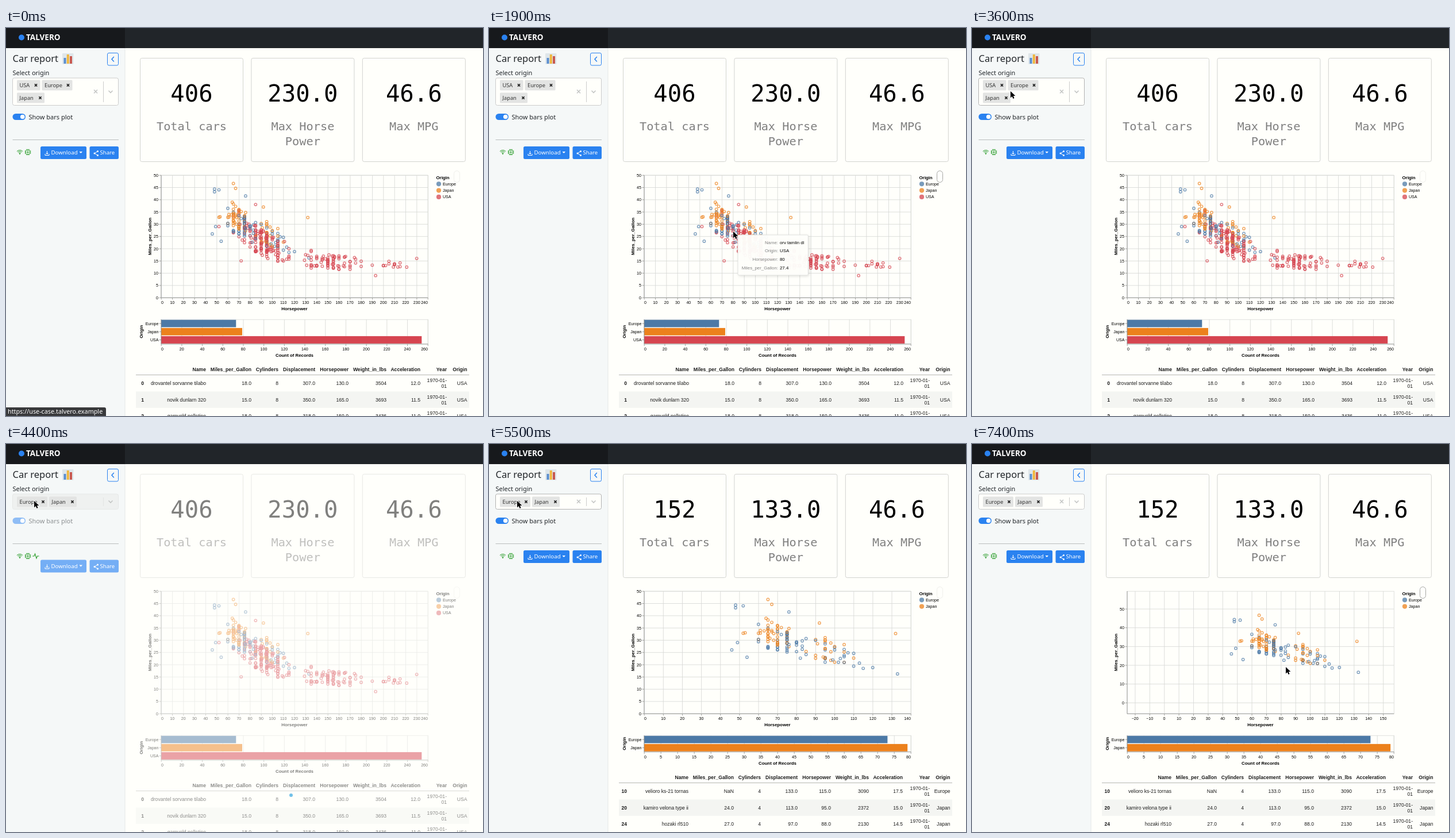
An HTML page with a canvas that plays this animation: 830 by 675 pixels, repeating every 8 s.

```html
<!DOCTYPE html>
<html lang="en">
<head>
<meta charset="utf-8">
<title>Car report</title>
<style>
html, body { margin: 0; width: 100%; height: 100%; overflow: hidden; }
canvas { display: block; }
</style>
</head>
<body>
<canvas id="stage" width="830" height="675"></canvas>
<script>
const c = document.getElementById('stage').getContext('2d');
const SANS = '"Liberation Sans", sans-serif';
const UI = '"Noto Sans", sans-serif';
const MONO = '"DejaVu Sans Mono", monospace';
const PAGE = '#fffffb', BLUE = '#2a82f0', GREEN = '#2a9d2a', GRID = '#d7d9d6';
const COLORS = { Europe: '#4c79a6', Japan: '#ec811c', USA: '#d64550' };
const LEFT = 270, RIGHT = 734, TOP = 256, BOTTOM = 469;

let seed = 11;
const rand = () => (seed = seed * 16807 % 2147483647) / 2147483647;
const points = [];
const add = (origin, hp, mpg) => points.push({ origin, hp, mpg, order: rand() });

// n cars around a horsepower, most of them on multiples of five, mileage near a falling curve
function cluster(origin, n, hp, spread, curve, half) {
  for (let i = 0; i < n; i++) {
    const raw = hp + (rand() + rand() - 1) * spread;
    const snapped = rand() < .7 ? Math.round(raw / 5) * 5 : Math.round(raw);
    add(origin, snapped, curve(snapped) + (rand() * 2 - 1) * half(snapped));
  }
}
const usaCurve = hp => 13 + 17 * Math.exp((70 - hp) / 35);
const usaHalf = hp => Math.max(.8, 6 - (hp - 70) / 30);
cluster('USA', 150, 91, 27, usaCurve, usaHalf);
cluster('USA', 75, 153, 28, usaCurve, usaHalf);
cluster('USA', 14, 208, 20, usaCurve, usaHalf);
cluster('Europe', 44, 76, 20, hp => 30 - (hp - 70) / 5, () => 5);
cluster('Europe', 20, 102, 20, hp => 30 - (hp - 70) / 5, () => 4);
cluster('Japan', 46, 68, 10, hp => 33.5 - (hp - 67) / 4, () => 5);
cluster('Japan', 24, 96, 15, hp => 33 - (hp - 67) / 4, () => 5);
// Cars far from the crowd
for (const [hp, mpg] of [[46, 26], [48, 43.2], [48, 44.3], [52, 44], [49, 29], [54, 23], [76, 41.5], [133, 16.2]]) add('Europe', hp, mpg);
for (const [hp, mpg] of [[65, 46.6], [67, 44.6], [52, 32.8], [53, 33], [92, 37], [132, 32.7]]) add('Japan', hp, mpg);
for (const [hp, mpg] of [[52, 29], [72, 15], [85, 38], [193, 9], [230, 16]]) add('USA', hp, mpg);
points.sort((a, b) => a.order - b.order);

const heads = ['Name', 'Miles_per_Gallon', 'Cylinders', 'Displacement', 'Horsepower', 'Weight_in_lbs', 'Acceleration', 'Year', 'Origin'];
const edges = [348, 427, 474, 538, 596, 662, 721, 767, 802.5];
const allRows = [
  ['0', 'drovantel sorvanne tilabo', '18.0', '8', '307.0', '130.0', '3504', '12.0', '', 'USA'],
  ['1', 'novik dunlarn 320', '15.0', '8', '350.0', '165.0', '3693', '11.5', '', 'USA'],
  ['2', 'garnvold pelletine', '18.0', '8', '318.0', '150.0', '3436', '11.0', '', 'USA']];
const someRows = [
  ['10', 'velioro ks-21 tornas', 'NaN', '4', '133.0', '115.0', '3090', '17.5', '', 'Europe'],
  ['20', 'kamiro velona type ii', '24.0', '4', '113.0', '95.0', '2372', '15.0', '', 'Japan'],
  ['24', 'hozaki rl510', '27.0', '4', '97.0', '88.0', '2130', '14.5', '', 'Japan']];

// Start, end, then the values shown
const tips = [
  [1300, 1500, 'velsor trandel diesel', 'Europe', '76', '25'],
  [1900, 2200, 'orv tamlin dl', 'USA', '80', '27.4'],
  [2300, 3000, 'garnvold tessaro hatchback', 'USA', '80', '28']];

// Pointer stops: time, x, y
const stops = [[400, 300, 73], [1100, 421, 361], [1300, 417, 360], [1900, 425, 354], [2300, 428, 350],
  [2700, 428, 345], [2900, 428, 345], [3600, 67, 110], [4000, 49, 99], [6100, 49, 99], [6600, 546, 388]];

function pointer(t) {
  const next = stops.findIndex(s => s[0] >= t);
  if (next < 1) return stops.at(next).slice(1);
  const [t0, x0, y0] = stops[next - 1], [t1, x1, y1] = stops[next];
  const u = (t - t0) / (t1 - t0), e = u * u * (3 - 2 * u);
  return [x0 + (x1 - x0) * e, y0 + (y1 - y0) * e];
}

// y is the middle of the capitals
function text(s, x, y, size, color = '#000', align = 'left', font = SANS, weight = '') {
  c.font = `${weight} ${size}px ${font}`;
  c.fillStyle = color;
  c.textAlign = align;
  c.fillText(s, x, y + size * .36);
}
function upright(s, x, y) {
  c.save();
  c.translate(x, y);
  c.rotate(-Math.PI / 2);
  text(s, 0, 0, 7.85, '#000', 'center', SANS, 'bold');
  c.restore();
}
function rect(x, y, w, h, color) {
  c.fillStyle = color;
  c.fillRect(x, y, w, h);
}
function box(x, y, w, h, r, fill, stroke) {
  c.beginPath();
  c.roundRect(x, y, w, h, r);
  if (fill) { c.fillStyle = fill; c.fill(); }
  if (stroke) { c.strokeStyle = stroke; c.lineWidth = 1; c.stroke(); }
}
function line(color, width, ...xy) {
  c.beginPath();
  for (let i = 0; i < xy.length; i += 2) c.lineTo(xy[i], xy[i + 1]);
  c.strokeStyle = color;
  c.lineWidth = width;
  c.stroke();
}
function disc(x, y, r, fill) {
  c.beginPath();
  c.arc(x, y, r, 0, 7);
  c.fillStyle = fill;
  c.fill();
}
function cross(x, y, r, color, width) {
  line(color, width, x - r, y - r, x + r, y + r);
  line(color, width, x - r, y + r, x + r, y - r);
}

function header() {
  rect(0, 0, 207, 35, '#17191c');
  rect(207, 0, 623, 35, '#212529');
  disc(27, 16.5, 5, BLUE);
  text('TALVERO', 35, 16.5, 13.5, '#fff', 'left', UI, 'bold');
}

function statusIcons(y, busy) {
  c.strokeStyle = GREEN;
  c.lineWidth = 1;
  for (const r of [2.5, 4.8, 7]) {
    c.beginPath();
    c.arc(24, y + 3.5, r, -Math.PI * .76, -Math.PI * .24);
    c.stroke();
  }
  disc(24, y + 3, 1, GREEN);
  box(34.5, y - 3.5, 7, 7, 1, null, GREEN);
  box(37, y - 1, 2, 2, 0, null, GREEN);
  for (const d of [-2, 0, 2]) {
    for (const s of [-1, 1]) {
      line(GREEN, .8, 38 + d, y + 3.5 * s, 38 + d, y + 5.5 * s);
      line(GREEN, .8, 38 + 3.5 * s, y + d, 38 + 5.5 * s, y + d);
    }
  }
  if (busy) line(GREEN, 1.1, 46, y, 49, y, 50.5, y - 4, 53, y + 4, 54.5, y, 57.5, y);
}

function buttons(y, busy) {
  const fill = busy ? '#74aef5' : BLUE;
  box(60, y - 11, 80, 22, 2.5, fill);
  box(145.5, y - 11, 50.5, 22, 2.5, fill);
  line('#fff', 1, 71.5, y - 3, 71.5, y + 2.5);
  line('#fff', 1, 69.5, y + .5, 71.5, y + 2.5, 73.5, y + .5);
  line('#fff', 1, 68, y + 2, 68, y + 4.5, 75, y + 4.5, 75, y + 2);
  text('Download', 78.5, y, 9.7, '#fff', 'left', UI);
  c.beginPath();
  c.moveTo(127.5, y - 2);
  c.lineTo(133, y - 2);
  c.lineTo(130.2, y + 1);
  c.fill();
  line('#fff', 1, 159.5, y - 2.5, 154, y + 1, 159.5, y + 4.5);
  for (const [x, d] of [[159.5, -2.5], [154, 1], [159.5, 4.5]]) disc(x, y + d, 1.5, '#fff');
  text('Share', 163.5, y, 9.6, '#fff', 'left', UI);
}

function sidebar(removed, busy, [px, py]) {
  const dy = removed ? -21 : 0, ink = '#212529';
  rect(0, 35, 207, 640, '#f5f8f8');
  rect(206.5, 35, 1, 640, '#e4e8e8');
  text('Car report', 11.5, 53, 16.5, ink, 'left', UI, 500);
  box(98, 44, 19.5, 19, 1, '#dfe6ea');
  rect(100.5, 52, 4, 10, '#5b8fd0');
  rect(105.8, 46, 4, 16, '#efb73e');
  rect(111, 49, 4, 13, '#c8584e');
  box(176.5, 43.5, 19, 21.5, 2.5, null, BLUE);
  line(BLUE, 1.5, 187.8, 50, 184, 54.2, 187.8, 58.4);
  text('Select origin', 11.5, 78, 11, ink, 'left', UI);

  const bottom = removed ? 113.5 : 134.5, mid = removed ? 100 : 110.5;
  const over = px > 11 && px < 196 && py > 87 && py < bottom;
  box(11.5, 87, 184, bottom - 87, 3, busy ? '#eff1f0' : PAGE, busy ? '#e6e8e7' : over ? '#b3b3b3' : '#ccc');
  const chips = removed ? [['Europe', 19, 91.5, 53], ['Japan', 75, 91.5, 48]]
    : [['USA', 19, 90.5, 40.5], ['Europe', 62.5, 90.5, 53], ['Japan', 19, 112.5, 48]];
  for (const [name, x, y, w] of chips) {
    box(x, y, w, 18, 1.5, '#e3e4e3');
    const hot = !busy && px > x + w - 14 && px < x + w && py > y && py < y + 18;
    if (hot) box(x + w - 14, y, 14, 18, 1.5, '#ffbdad');
    text(name, x + 4.5, y + 9, 9.25, '#333', 'left', UI);
    cross(x + w - 7.5, y + 9, 2.1, hot ? '#de350b' : '#222', 1.5);
  }
  if (!busy) cross(156, mid, 3, '#c4c6c5', 1.6);
  line(busy ? '#e2e4e3' : '#ccc', 1, 169.5, 93, 169.5, bottom - 5.5);
  line('#c4c6c5', 1.6, 178.5, mid - 1.5, 182, mid + 2, 185.5, mid - 1.5);

  box(11.5, 149 + dy, 22.5, 11, 5.5, busy ? '#8fbdf5' : BLUE);
  disc(28.7, 154.5 + dy, 3.8, '#fff');
  text('Show bars plot', 39.5, 155 + dy, 11, busy ? '#8c9092' : ink, 'left', UI);
  line('#b9bdbd', 1, 11.5, 194.5 + dy, 196, 194.5 + dy);
  statusIcons(216 + dy, busy);
  buttons(busy ? 212.5 : 217 + dy, busy);
}

function cards(fresh) {
  const list = [[fresh ? '152' : '406', 'Total cars'],
    [fresh ? '133.0' : '230.0', 'Max Horse', 'Power'], ['46.6', 'Max MPG']];
  list.forEach(([value, ...label], i) => {
    const x = 233.5 + 193.4 * i;
    box(x, 52.5, 179, 180, 3, null, '#d2d3d0');
    text(value, x + 89.5, 113.3, 40.6, '#000', 'center', MONO);
    label.forEach((s, row) => text(s, x + 89.5, 171 + 26 * row, 20.3, '#808080', 'center', MONO));
  });
}

const number = v => String(v).replace('-', '−');
function tickX(v, x, y0, y1) {
  line(GRID, .85, x + .2, y0, x + .2, y1);
  line('#888', .8, x + .2, y1, x + .2, y1 + 3.5);
  const align = Math.abs(x - LEFT) < 1 ? 'left' : Math.abs(x - RIGHT) < 1 ? 'right' : 'center';
  text(number(v), x, y1 + 8.6, 7.1, '#000', align);
}

function scatter(fresh, zoom) {
  const grow = (lo, hi, at) => [at - (at - lo) * zoom, at + (hi - at) * zoom];
  const [x0, x1] = grow(0, fresh ? 140 : 240, 83.3);
  const [y0, y1] = grow(0, 50, 19);
  const sx = v => LEFT + (v - x0) / (x1 - x0) * (RIGHT - LEFT);
  const sy = v => BOTTOM - (v - y0) / (y1 - y0) * (BOTTOM - TOP);
  const stepY = y1 - y0 > 56.6 ? 10 : 5;
  for (let v = Math.ceil(x0 / 10) * 10; v <= x1 + .01; v += 10) tickX(v, sx(v), TOP, BOTTOM);
  for (let v = Math.ceil(y0 / stepY) * stepY; v <= y1 + .01; v += stepY) {
    const y = sy(v) + .2;
    line(GRID, .85, LEFT, y, RIGHT, y);
    line('#888', .8, LEFT - 3.5, y, LEFT, y);
    text(number(v), 265, y, 7.1, '#000', 'right');
  }
  c.strokeStyle = GRID;
  c.strokeRect(LEFT, TOP + .2, RIGHT - LEFT + .3, BOTTOM - TOP);
  line('#888', .8, LEFT, TOP, LEFT, BOTTOM + .3, RIGHT + .3, BOTTOM + .3);
  text('Horsepower', 502, 488, 7.85, '#000', 'center', SANS, 'bold');
  upright('Miles_per_Gallon', 250.5, 362.5);

  c.globalAlpha = .7;
  c.lineWidth = 1.42;
  for (const p of points) {
    if (fresh && p.origin === 'USA') continue;
    c.beginPath();
    c.arc(sx(p.hp), sy(p.mpg), 2.2, 0, 7);
    c.strokeStyle = COLORS[p.origin];
    c.stroke();
  }
  c.globalAlpha = 1;
}

function legend(names, over) {
  text('Origin', 748.5, 260, 7.85, '#000', 'left', SANS, 'bold');
  names.forEach((name, i) => {
    const y = 271.3 + 11.3 * i;
    c.globalAlpha = .75;
    disc(753, y, 4.1, COLORS[name]);
    c.globalAlpha = 1;
    text(name, 760, y, 7.1);
  });
  box(779.5, 248.5, 10, 20, 5, null, over ? '#a5a6a4' : '#efefec');
}

function bars(names, fresh) {
  const counts = { Europe: 73, Japan: 79, USA: 254 };
  const max = fresh ? 80 : 260, step = fresh ? 5 : 20;
  const end = 507 + 14.2 * names.length;
  for (let v = 0; v <= max; v += step) tickX(v, LEFT + v / max * (RIGHT - LEFT), 507, end);
  c.strokeStyle = GRID;
  c.strokeRect(LEFT, 507.2, RIGHT - LEFT + .3, end - 507);
  names.forEach((name, i) => {
    const y = 507.7 + 14.2 * i;
    rect(LEFT, y, counts[name] / max * (RIGHT - LEFT), 12.8, COLORS[name]);
    line('#888', .8, 266.5, y + 6.4, LEFT, y + 6.4);
    text(name, 265.5, y + 6.4, 7.1, '#000', 'right');
  });
  line('#888', .8, LEFT, 507, LEFT, end + .3, RIGHT + .3, end + .3);
  text('Count of Records', 502, end + 19.5, 7.85, '#000', 'center', SANS, 'bold');
  upright('Origin', 235.5, (507 + end) / 2);
}

function table(fresh) {
  const y = fresh ? 580 : 594, size = 8.6, ink = '#1c1c1c';
  const right = i => edges[i] - (fresh && i < 7 ? 1 : 0);
  rect(226, y + 38.4, 580, 28.4, '#f4f5f2');
  heads.forEach((h, i) => text(h, right(i), y, size, ink, 'right', SANS, 'bold'));
  line('#b5b6b3', 1, 226, y + 9.5, 806, y + 9.5);
  (fresh ? someRows : allRows).forEach(([index, ...cells], r) => {
    const ry = y + 24.2 + 28.4 * r;
    text(index, 240, ry, size, ink, 'right', SANS, 'bold');
    cells.forEach((s, i) => text(s, right(i), ry, size, ink, 'right'));
    text('1970-01-', 767, ry - 4.8, size, ink, 'right');
    text('01', 767, ry + 5.2, size, ink, 'right');
  });
}

function loader(t) {
  rect(208, 35, 622, 640, 'rgba(255,255,251,.5)');
  // The page stalls between 4600 and 5000
  const u = Math.min(t, 4600) + Math.max(0, t - 5000);
  for (let i = 0; i < 3; i++) {
    c.globalAlpha = Math.max(0, Math.cos(u / 1000 * Math.PI * 2 - .2 + 1.6 * (i - 1)));
    disc(496 + 20 * i, 611, 3, '#45ade3');
  }
  c.globalAlpha = 1;
}

function tooltip(values, px, py) {
  const x = px + 8, y = py + 6, size = 7.85;
  c.font = `${size}px ${SANS}`;
  const w = 80 + c.measureText(values[0]).width;
  c.save();
  c.shadowColor = 'rgba(0,0,0,.15)';
  c.shadowBlur = 5;
  c.shadowOffsetX = c.shadowOffsetY = 1.5;
  box(x, y, w, 70, 2, 'rgba(255,255,252,.96)');
  c.restore();
  box(x, y, w, 70, 2, null, '#e2e3e0');
  ['Name:', 'Origin:', 'Horsepower:', 'Miles_per_Gallon:'].forEach((key, i) => {
    text(key, x + 70, y + 13 + 14.6 * i, size, '#848484', 'right');
    text(values[i], x + 73, y + 13 + 14.6 * i, size);
  });
}

const ARROW = new Path2D('M0 0V11.5L2.7 9 4.6 13 6.6 12 4.8 8.2 8.4 8Z');
function arrow(x, y) {
  c.save();
  c.translate(x, y);
  c.lineWidth = 1.4;
  c.strokeStyle = '#fff';
  c.stroke(ARROW);
  c.fillStyle = '#000';
  c.fill(ARROW);
  c.restore();
}

function draw(t) {
  const removed = t >= 4200, fresh = t >= 5500, busy = removed && !fresh;
  const shown = t >= 400, at = shown ? pointer(t) : [-9, -9];
  const names = fresh ? ['Europe', 'Japan'] : ['Europe', 'Japan', 'USA'];
  const turns = [7100, 7200, 7400].filter(when => t >= when).length;
  rect(0, 0, 830, 675, PAGE);
  cards(fresh);
  scatter(fresh, 1.305 ** (turns / 3));
  legend(names, at[0] > 227 && at[1] > 245);
  bars(names, fresh);
  table(fresh);
  if (busy) loader(t);
  sidebar(removed, busy, at);
  header();
  const tip = tips.find(([from, to]) => t >= from && t < to);
  if (tip) tooltip(tip.slice(2), ...at);
  if (shown) arrow(...at);
  else {
    box(-3, 660, 177, 18, 3, '#38393b');
    text('https://use-case.talvero.example', 3, 667.5, 10.8, '#fff', 'left', UI);
  }
}

// The screen refreshes ten times a second
const start = performance.now();
function frame() {
  draw(Math.floor((performance.now() - start) % 8000 / 100) * 100);
  requestAnimationFrame(frame);
}
frame();
</script>
</body>
</html>
```
